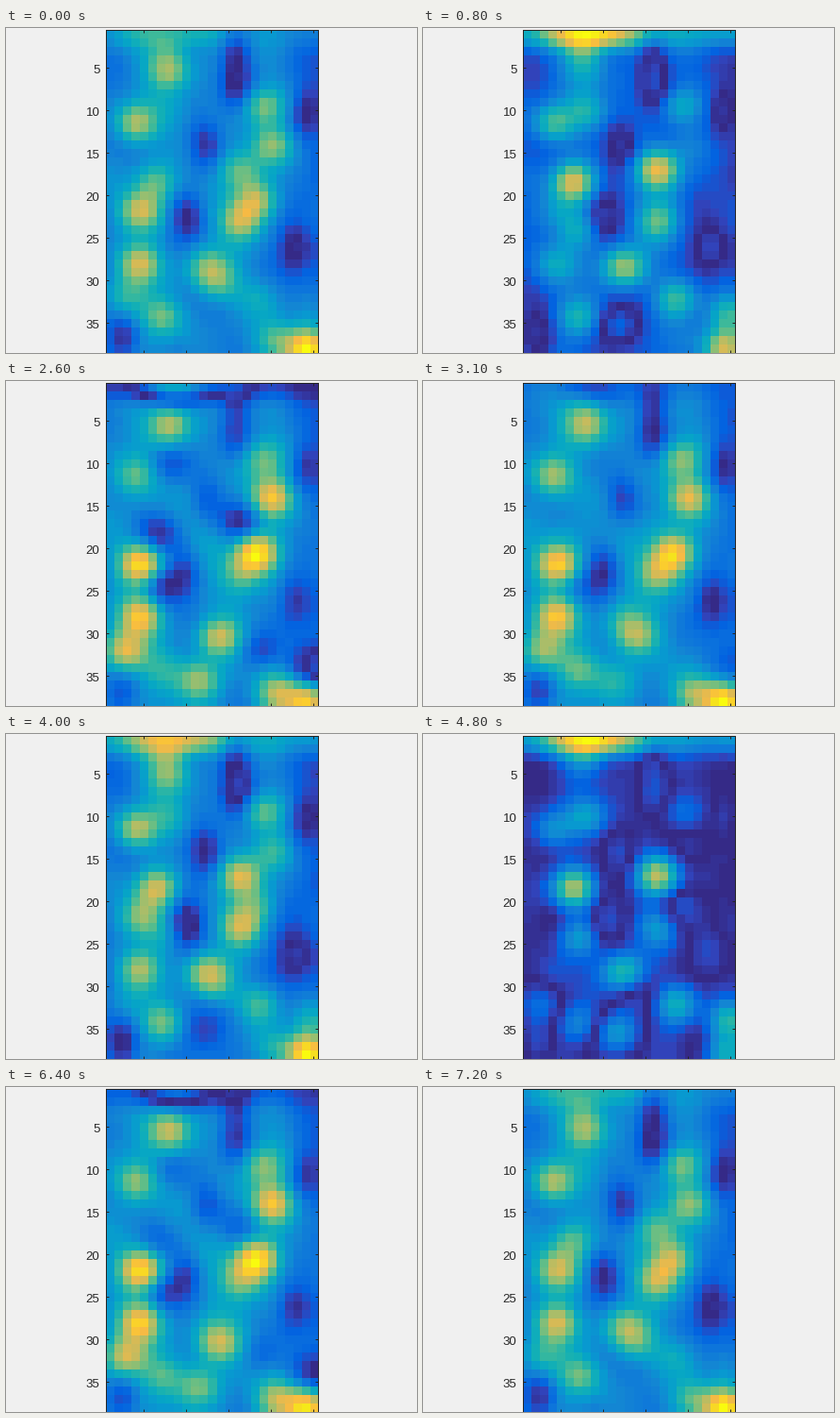
These frames come from a looping animation (436x344 px, 7300 ms). A matplotlib script:

```python
import numpy as np
import matplotlib.pyplot as plt
from matplotlib.animation import FuncAnimation
from matplotlib.colors import LinearSegmentedColormap

W, H, DPI = 436, 344, 100
COLS, ROWS, CELL = 25, 38, 9
LEFT, TOP = 106, 2
RIGHT, BOTTOM = LEFT + COLS * CELL, TOP + ROWS * CELL
STEPS = 72
INK = "#262626"
PX = 72 / DPI

STOPS = """#352a87 #3243ba #0363e1 #0d75dc #1485d4 #0998d1 #06a7c6 #15b1b4
#38b99e #65be86 #92bf73 #b7bd64 #d9ba56 #f8bb44 #fcce2e #f5e41d #f9fb0e"""
CMAP = LinearSegmentedColormap.from_list("sea", STOPS.split(), N=64)

# Oscillating spots down each side: column, row, strength, phase in degrees
LEFT_SPOTS = [
    (7.7, 3, 0.35, 50), (8, 5.3, 0.5, -25), (4, 11.5, 0.6, 8),
    (8, 10, 0.4, 70), (6.5, 18.4, 0.75, 56), (4.7, 21.8, 0.72, -36),
    (7, 24.2, 0.45, 85), (4.5, 27.9, 0.67, -22), (2.8, 32, 0.5, -55),
    (7, 34.3, 0.45, 14),
]
RIGHT_SPOTS = [
    (19, 9.5, 0.5, 0), (20, 14, 0.65, -38), (16.3, 17, 0.8, 60),
    (18.2, 20.5, 0.8, -42), (16.3, 23, 0.55, 8), (12.4, 28.4, 0.6, 48),
    (13.7, 30.4, 0.5, -45), (18.5, 32, 0.5, 70), (11.6, 35.4, 0.5, -90),
    (24.7, 34, 0.5, 72), (20.5, 37, 0.45, -35), (24.2, 38, 1.0, 0),
]
HOLLOWS = [(15.7, 3), (15.7, 7), (12.2, 14), (24, 10), (10, 22.5),
           (22.5, 26), (2.5, 37)]

col, row = np.meshgrid(np.arange(1, COLS + 1), np.arange(1, ROWS + 1))


def bump(x, y, sx=1.75, sy=1.65):
    return np.exp(-(((col - x) / sx) ** 2 + ((row - y) / sy) ** 2) / 2)


def turn(degrees):
    return np.exp(-1j * np.radians(degrees))


def ripple(waves=14, level=0.05):
    """Soft irregular texture from random plane waves."""
    rng = np.random.default_rng(4)
    total = np.zeros((ROWS, COLS), complex)
    for _ in range(waves):
        angle, start = rng.uniform(0, 2 * np.pi, 2)
        pitch = 2 * np.pi / rng.uniform(6, 12)
        along = col * np.cos(angle) + row * np.sin(angle)
        total += np.cos(pitch * along + start) * turn(rng.uniform(0, 360))
    return level * total / np.sqrt(waves / 2)


def build_mode():
    """Complex field whose rotating real part gives the pulsing map."""
    base = 0.33 - 0.12 / (1 + np.exp(21.5 - col))
    mode = base * turn(-25) + ripple()
    strip = 0.35 + 0.75 * np.exp(-((col - 9) / 4) ** 2 / 2)
    mode += strip * np.exp(-((row - 1) / 1.2) ** 2 / 2) * turn(75)
    for x, y, strength, phase in LEFT_SPOTS + RIGHT_SPOTS:
        mode += strength * bump(x, y) * turn(phase)
    for x, y in HOLLOWS:
        mode -= 0.27 * bump(x, y, 1.3, 2)
    return mode


MODE = build_mode()


def field(k):
    return np.abs((MODE * np.exp(2j * np.pi * k / STEPS)).real)


fig = plt.figure(figsize=(W / DPI, H / DPI), dpi=DPI, facecolor="#f0f0f0")
ax = fig.add_axes([0, 0, 1, 1])
ax.axis("off")
image = ax.imshow(field(0), cmap=CMAP, interpolation="nearest", aspect="auto",
                  extent=(LEFT, RIGHT, BOTTOM, TOP))
ax.set_xlim(0, W)
ax.set_ylim(H, 0)


def line(xs, ys):
    ax.plot(xs, ys, color=INK, lw=PX, solid_capstyle="butt",
            solid_joinstyle="miter")


# The frame runs through the pixel just before each edge
x0, x1, y0, y1 = (edge - 0.5 for edge in (LEFT, RIGHT, TOP, BOTTOM))
line([x0, x1, x1, x0, x0], [y0, y0, y1, y1, y0])
for r in range(5, ROWS, 5):
    y = y0 + (r - 0.5) * CELL
    line([x0, x0 + 3], [y, y])
    line([x1 - 3, x1], [y, y])
    ax.text(99.5, y + 6, str(r), ha="right", va="baseline", color=INK,
            family="Liberation Sans", size=13.3 * PX)
for c in range(5, COLS + 1, 5):
    x = x0 + (c - 0.5) * CELL
    line([x, x], [y0, y0 + 3])
    line([x, x], [y1 - 3, y1])


def draw(k):
    data = field(k)
    image.set_data(data)
    image.set_clim(data.min(), data.max())
    return [image]


anim = FuncAnimation(fig, draw, frames=STEPS + 1, interval=100,
                     repeat=True, repeat_delay=0)
plt.show()
```
